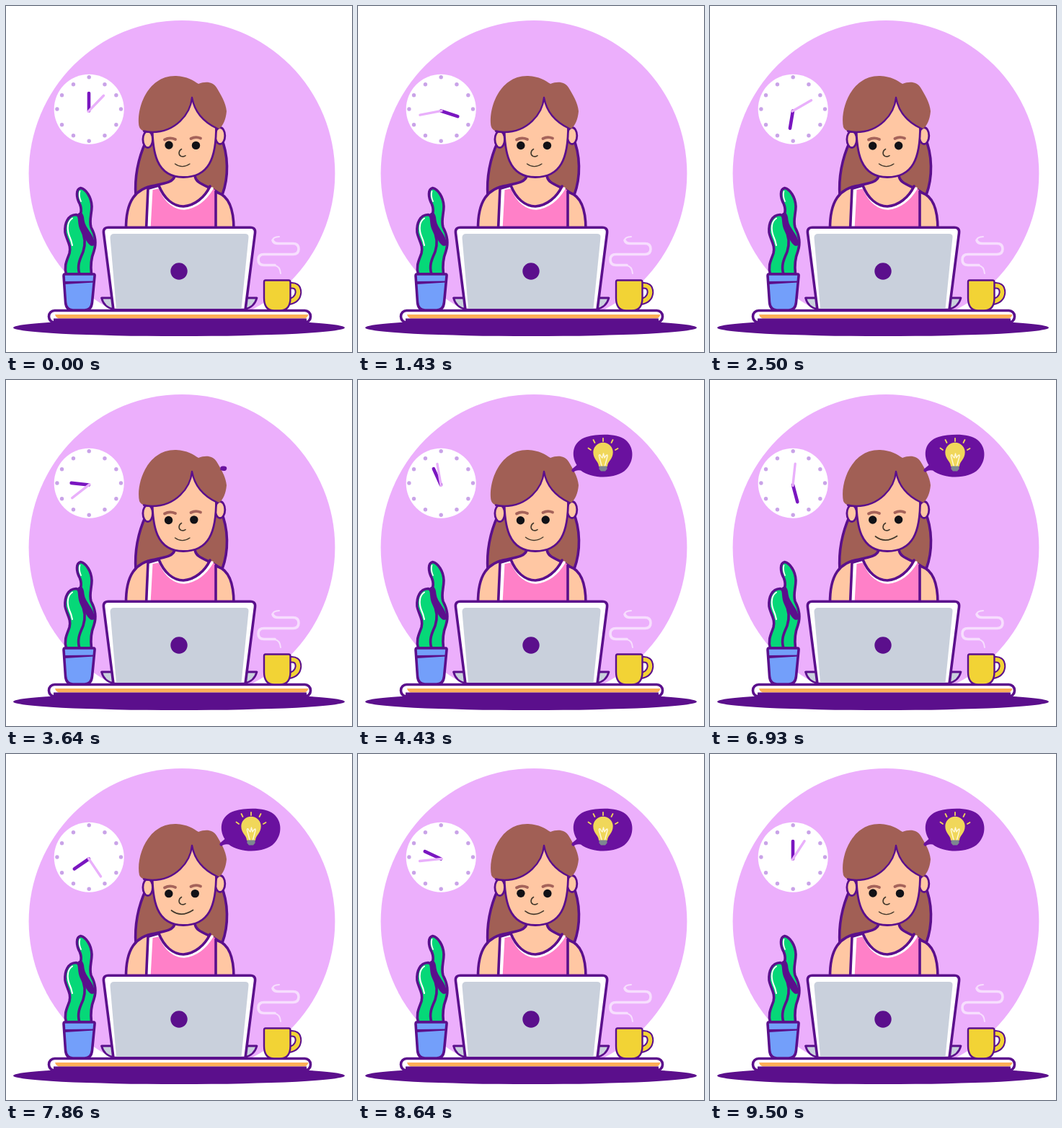
An HTML page for the animation above (9.57 s loop, 480x480 px).

```html
<!DOCTYPE html>
<html lang="en">
<head>
<meta charset="utf-8">
<title>Working at the desk</title>
<style>
html, body { margin: 0; width: 100%; height: 100%; overflow: hidden; background: #fff; }
svg { display: block; width: 100%; height: 100%; }
.line { stroke: #5b0f8c; stroke-width: 3.6; stroke-linejoin: round; stroke-linecap: round; }
.thin { stroke-width: 2.8; }
.none { fill: none; }
.ink { fill: #5b0f8c; }
.skin { fill: #ffc7a3; }
.hair { fill: #a15f55; }
.grey { fill: #c9d0dc; }
.white { fill: #fff; }
.green { fill: #06d878; }
.round { fill: none; stroke-linecap: round; stroke-linejoin: round; }
</style>
</head>
<body>
<svg viewBox="0 0 480 480">
  <circle cx="244" cy="232.300" r="212.400" fill="#ecaffc"/>

  <g id="clock">
    <circle cx="115.200" cy="143.300" r="48.500" fill="#fff"/>
    <g id="dots" fill="#c9a3e8"></g>
    <path id="hour" class="round" d="M0 0V-24.500" stroke="#7a16c0" stroke-width="4.600"/>
    <path id="minute" class="round" d="M0 1V-29.500" stroke="#e9b0fb" stroke-width="3.400"/>
  </g>

  <!-- steam -->
  <g class="round" stroke="#f7defe">
    <path stroke-width="2" d="M379 320Q370 320.500 370 325M373 360Q380 361 381 371"/>
    <path stroke-width="3.600" d="M370 325Q371 329.500 378 329.500H398Q406 329.500 406 337Q406 344.500 398 344.500H358Q350 344.500 350 352Q350 359.500 358 359.500H373"/>
  </g>

  <ellipse class="ink" cx="240" cy="446.300" rx="230" ry="11.800"/>

  <!-- long hair and body -->
  <path class="line hair" d="M194 188C184 210 178 235 180 264L230 249H262L300 262C309 238 309 206 298 182Z"/>
  <path class="line skin" d="M234 235C233 244 222 246 206 249C180 253 166 270 166.500 310H316C316 280 309 264 294 259C281 249 263 248 262 235Z"/>
  <path fill="#ff80c8" d="M198 253L212 248.500C219 267 232 278 246 278C262 277 276 265 283 250L292 257V310H194.500Z"/>
  <path class="white" d="M198 253L213 249L215 253L203.500 255L200.500 310H196Z"/>
  <path class="round" stroke="#fff" stroke-width="3.500" d="M214 254C222 272 234 281 247 281C264 279 277 268 286 253"/>
  <path class="line none" d="M197 253L194.500 310M212 249C219 267 232 278 246 278C262 277 276 265 283 250M291 257V310M198 253L212 249"/>

  <!-- head -->
  <ellipse class="line thin skin" cx="196.700" cy="185" rx="6.800" ry="11.500"/>
  <ellipse class="line thin skin" cx="297" cy="180" rx="6.800" ry="11.500"/>
  <path class="line thin skin" d="M203 165C203 202 208 237.500 246 237.500C281 237.500 292 212 291.500 165L258 127Z"/>
  <path class="hair" d="M185 168C180 145 195 96 236 97C252 98 259 103 267 108C277 104 287 105 292 113C298 123 305 134 306 146C305 158 301 166 296 170C278 165 262 150 258 127C256 150 235 175 203 175C193 175 187 173 185 168Z"/>
  <path class="line none" style="stroke-width:2.400" d="M191 173.500Q196 175 203 175C235 175 256 150 258 127C262 150 276 162 293 170"/>
  <g class="round" stroke="#a5635a" stroke-width="3.800">
    <path d="M220 185.500Q227 181.500 235 185"/>
    <path d="M256.500 184Q263 180.500 270 183.500"/>
  </g>
  <g fill="#111116">
    <circle id="eyeL" r="5.700"/>
    <circle id="eyeR" r="5.700"/>
  </g>
  <g class="round" stroke="#43392c" stroke-width="1.600">
    <path d="M243.500 198.500C239 201 239 207 243 208.500Q247 209.500 249 207.500"/>
    <path id="mouth"/>
  </g>

  <g id="bubble">
    <path fill="#6a119f" d="M297 127Q295.500 125 297 123.500L303.500 118C295 104 297.500 85 317 79C334 74.500 360 74 371 83C383.500 93 383.500 112 372 124C360 137 326 138.500 309 125.500Q302 124.500 299 128Z"/>
    <g id="bulb">
      <path class="round" stroke="#f0d75a" stroke-width="1.800" d="M340 81V85M326.500 83L328.500 87M353.500 83L351.500 87M319.500 94.500L323 97M360.500 95L357 97"/>
      <path fill="#f0d75a" d="M334 120C334 113 326.300 110 326.300 100.500A13.700 13.700 0 0 1 353.700 100.500C353.700 110 346 113 346 120Z"/>
      <path class="round" stroke="#fff8d8" stroke-width="1.400" d="M338 119L334.500 106Q334 103 336 104Q338 108 339 108L340.500 102L342 108Q344 104 346 104Q346.500 105 345.500 108L342.500 119"/>
      <path fill="#7d8791" d="M334.500 119.500H345.500V123.500L343 126.500H337L334.500 123.500Z"/>
    </g>
  </g>

  <!-- desk -->
  <rect class="line white" x="59.500" y="422.500" width="363" height="16.500" rx="8"/>
  <path fill="#fdae57" d="M68 428H419.500Q418.500 432 415 433.500H73Q69 432 68 428Z"/>
  <path class="ink" d="M66 433.500H417V441H66Z"/>

  <!-- laptop -->
  <path class="line grey thin" d="M132.500 405H149V420.500C140 419 135 414 132.500 405ZM348 405H331V420.500C340 419 345.500 414 348 405Z"/>
  <path class="line white" d="M142 307.300H339Q346.500 307.300 345.500 315L332 421.500H149L135.500 315Q134.500 307.300 142 307.300Z"/>
  <path class="grey" d="M150 316H331.500Q337 316 336.500 321L326.500 420H153L144.500 321.500Q144.500 316 150 316Z"/>
  <circle class="ink" cx="240" cy="368" r="11.700"/>

  <!-- plant -->
  <path class="line green" d="M103.500 252.500C111 254 118.500 265 119 278C119 289 115 297 118 307C124 318 126 328 122 340C118 350 117 360 118.500 372H97V300C104 291 106 284 102.500 275C97 265 97 254 103.500 252.500Z"/>
  <path class="round" stroke="#fff" stroke-width="1.800" d="M102.500 257Q100.500 263 104 271"/>
  <path class="ink" d="M100 288C105 284 108 289 108.500 297C110 309 122 316 123.500 331C118 336 114 330 110 323C105 312 99 300 100 288Z"/>
  <path class="line green" d="M97 289.500C86 290 81 301 82 314C84 325 91 332 88 343C85 352 80 360 83.500 372H102C98 360 103 350 107 341C111 329 109 318 104 309C100 300 104 290 97 289.500Z"/>
  <path class="round" stroke="#fff" stroke-width="2" d="M92 294.500C85 299 84.500 309 87.500 318Q91 326 92 332"/>
  <path class="line" fill="#739ffa" d="M81.500 372H121.500Q123.500 372 123 374.500L119.500 411Q118.500 422 109 422H93Q83.500 422 82.500 411L80 374.500Q80 372 81.500 372Z"/>
  <path class="ink" d="M81 382L122 381.500V383.500L82 386Z"/>

  <!-- mug -->
  <path class="round" stroke="#5b0f8c" stroke-width="9.600" d="M393 388Q405.500 386 405.500 397.500Q404.500 408.500 391 410.500"/>
  <path class="round" stroke="#f2d335" stroke-width="5.600" d="M393 388Q405.500 386 405.500 397.500Q404.500 408.500 391 410.500"/>
  <path class="line" fill="#f2d335" style="stroke-width:2.400" d="M360 380.500H392Q394.500 380.500 394.500 383V405Q394.500 422.500 380 422.500H372Q358 422.500 358 405V383Q358 380.500 360 380.500Z"/>
</svg>
<script>
const LOOP = 9570, FPS = 14, END = 9.5;
const $ = id => document.getElementById(id);
const set = (id, name, value) => $(id).setAttribute(name, value);
const ramp = (t, from, to) => Math.min(1, Math.max(0, (t - from) / (to - from)));
const ease = (t, from, to) => { const p = ramp(t, from, to); return p * p * (3 - 2 * p); };

// quarter-hour dots sit slightly further out than the others
for (let i = 0; i < 12; i++) {
  const a = i * Math.PI / 6;
  const [y, rx, ry] = i % 3 ? [144.2, 43.5, 41] : [143, 44.3, 44.3];
  const dot = document.createElementNS("http://www.w3.org/2000/svg", "circle");
  dot.setAttribute("cx", 115.2 + rx * Math.sin(a));
  dot.setAttribute("cy", y - ry * Math.cos(a));
  dot.setAttribute("r", 2.7);
  $("dots").append(dot);
}

function turn(id, angle) {
  set(id, "transform", `translate(115 145.5) rotate(${angle})`);
}

function place(id, x, y) {
  set(id, "cx", x);
  set(id, "cy", y);
}

function grow(id, size, x, y) {
  set(id, "visibility", size > 0 ? "visible" : "hidden");
  set(id, "transform", `translate(${x} ${y}) scale(${size}) translate(${-x} ${-y})`);
}

function draw(ms) {
  // the motion advances in steps of 1/14 s
  const t = Math.min(END, Math.floor((ms + 5) * FPS / 1000) / FPS);

  turn("hour", 720 * t / END);
  turn("minute", 44 + 1429 * t / END);

  const look = 1 - Math.abs(2 * t / END - 1);
  place("eyeL", 226 - 0.6 * look, 193 + 1.9 * look);
  place("eyeR", 263.5 - 3.5 * look, 193.4 + 0.6 * look);

  const smile = ease(t, 4, 5) - ease(t, 7.86, 9.5);
  const mix = (a, b) => a + (b - a) * smile;
  set("mouth", "d", `M${mix(234.5, 229.5)} ${mix(219, 217)}Q${mix(244.5, 243)} ${mix(226.3, 227.5)} ${mix(255, 259.5)} ${mix(219, 216.5)}`);
  set("mouth", "stroke-width", mix(1.3, 1.7));

  grow("bubble", 1.05 * ease(t, 3.57, 3.93) - 0.05 * ease(t, 3.93, 4.25), 297, 125);
  grow("bulb", ease(t, 3.66, 4), 340, 104);
}

const start = performance.now();
function tick() {
  draw((performance.now() - start) % LOOP);
  requestAnimationFrame(tick);
}
draw(0);
requestAnimationFrame(tick);
</script>
</body>
</html>
```
